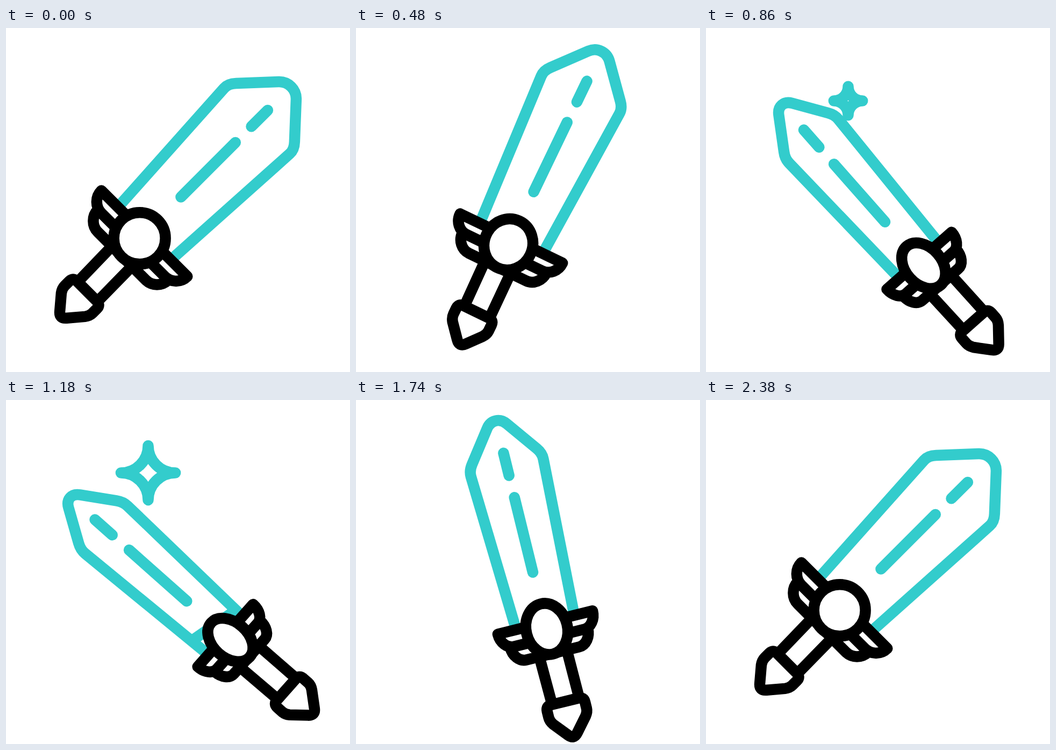
Write an HTML page that moves like this. It is 640 by 640 pixels and loops after 2400 ms.

```html
<!DOCTYPE html>
<html lang="en">
<head>
<meta charset="utf-8">
<title>Sword</title>
<style>
html, body { margin: 0; width: 100%; height: 100%; overflow: hidden; background: #fff; }
svg { display: block; width: 100vw; height: 100vh; }
path, circle {
  fill: none; stroke: #000; stroke-width: 20.5;
  stroke-linecap: round; stroke-linejoin: round;
  vector-effect: non-scaling-stroke;
}
.teal path { stroke: #3cc; }
.flat { stroke-linecap: butt; }
</style>
</head>
<body>
<svg viewBox="0 0 640 640">
  <defs>
    <clipPath id="inside">
      <path d="M-69.4 -12L-86.3 -308.7Q-87 -320 -77 -330.6L-23.3 -388.6A31.7 31.7 0 0 1 23.3 -388.6L77 -330.6Q87 -320 86.3 -308.7L69.4 -12Z"/>
    </clipPath>
    <path id="wing" d="M38 -12.4H113A29.6 29.6 0 0 1 83.4 17.2H38M92.5 17.2A29.6 29.6 0 0 1 62.9 46.8H0"/>
  </defs>
  <g id="star" class="teal">
    <path d="M0 -60A60 60 0 0 0 60 0A60 60 0 0 0 0 60A60 60 0 0 0 -60 0A60 60 0 0 0 0 -60Z"/>
  </g>
  <g id="sword">
    <g id="blade" class="teal">
      <g clip-path="url(#inside)"><path id="shine" class="flat" d="M-120 -20L120 20"/></g>
      <path class="flat" d="M-69.4 -12L-86.3 -308.7Q-87 -320 -77 -330.6L-23.3 -388.6A31.7 31.7 0 0 1 23.3 -388.6L77 -330.6Q87 -320 86.3 -308.7L69.4 -12"/>
      <path d="M0 -108.6V-252M0 -294V-337"/>
    </g>
    <path class="flat" d="M-26 42L-24 139M26.7 42L27.8 139"/>
    <path d="M-26 139H26Q36.5 139 36.5 149V161Q36.5 168 31 175L9 201Q0 212 -9 201L-31 175Q-36 168 -36 161V149Q-36 139 -26 139Z"/>
    <g id="guard">
      <use href="#wing"/>
      <use href="#wing" transform="scale(-1 1)"/>
      <circle r="48" style="fill:#fff"/>
    </g>
  </g>
</svg>
<script>
const LOOP = 2400;
const el = id => document.getElementById(id);
const [star, sword, blade, guard, shine] = ['star', 'sword', 'blade', 'guard', 'shine'].map(el);
const span = (t, a, b) => Math.min(1, Math.max(0, (t - a) / (b - a)));
const mix = (a, b, k) => a + (b - a) * k;
const smooth = x => x * x * (3 - 2 * x);

// Symmetric cubic bezier (h, 0, 1 - h, 1)
function ease(x, h = 0.75) {
  let lo = 0, hi = 1;
  for (let i = 0; i < 30; i++) {
    const s = (lo + hi) / 2, r = 1 - s;
    if (3 * r * r * s * h + 3 * r * s * s * (1 - h) + s * s * s < x) lo = s;
    else hi = s;
  }
  return smooth((lo + hi) / 2);
}

function draw(t) {
  const k = t < 1200 ? ease(span(t, 0, 1200)) : 1 - ease(span(t, 1200, 2360));
  const pos = `${mix(248.6, 417.5, k)} ${mix(391.2, 446.4, k)}`;
  sword.setAttribute('transform', `translate(${pos}) rotate(${mix(45, -48.4, k)})`);

  const squash = `scale(${mix(1, 0.687, k)} 1)`;
  blade.setAttribute('transform', squash);
  guard.setAttribute('transform', squash);

  const sweep = span(t, 1136, 1600);
  shine.style.display = sweep > 0 && sweep < 1 ? '' : 'none';
  shine.setAttribute('transform', `translate(0 ${mix(0, -430, sweep)})`);

  const size = smooth(t < 1080 ? span(t, 670, 1080) : 1 - span(t, 1080, 1480));
  star.style.display = size > 0.002 ? '' : 'none';
  star.setAttribute('transform', `translate(264.5 135.5) scale(${Math.max(size, 0.002)})`);
}

let start;
function tick(now) {
  start ??= now;
  draw((now - start) % LOOP);
  requestAnimationFrame(tick);
}
draw(0);
requestAnimationFrame(tick);
</script>
</body>
</html>
```
